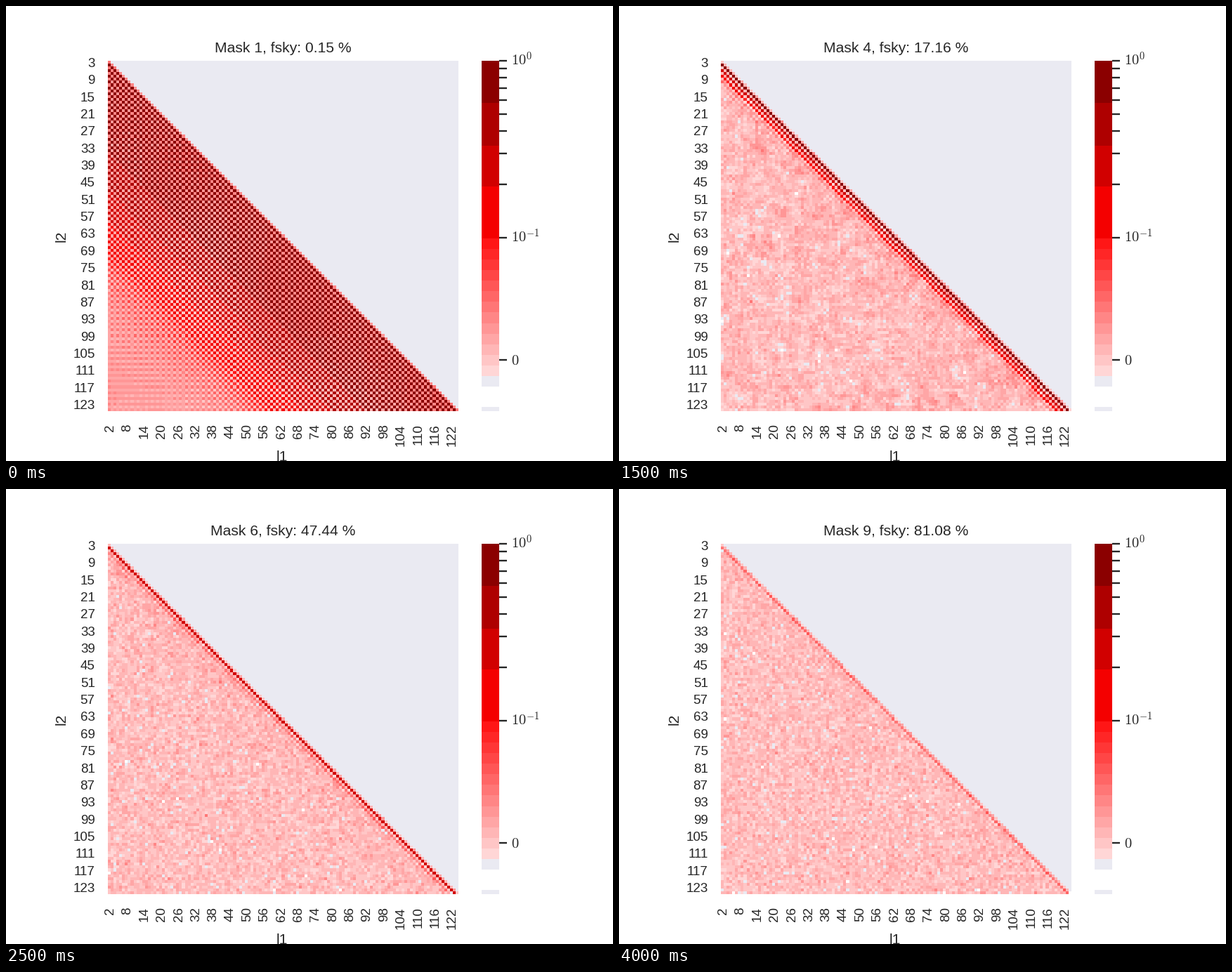
Animation, 864 px wide and 648 px high, one loop 4500 ms. Source, as a matplotlib script:

```python
import numpy as np
import matplotlib.pyplot as plt
from matplotlib.animation import FuncAnimation
from matplotlib.patches import Rectangle

plt.rcParams["font.family"] = "Liberation Sans"
plt.rcParams["mathtext.fontset"] = "cm"

W, H, DPI = 864, 648, 135
N = 123                                  # cells per side
LEFT, RIGHT, TOP, BOTTOM = 144.72, 643.68, 77.76, 576.72
CELL = (RIGHT - LEFT) / N
BAR_X, BAR_W, TICK = 677.16, 24.95, 11.25
INK = "#262626"
PALE, WHITE = (234, 234, 242), (255, 255, 255)

SKY = [0.15, 2.73, 7.48, 17.16, 31.57, 47.44, 63.33, 72.52, 81.08]  # percent

# Colour bands from the top of the colour bar to its bottom
EDGES = np.r_[TOP, 138, 199, 257, 331.2 + 15.04 * np.arange(15), 571.2, BOTTOM]
DARK = [(int(r), 0, 0) for r in np.linspace(139, 244, 4)]
TINTS = [(255, int(g), int(g)) for g in np.linspace(22, 214, 13)]
COLORS = np.array(DARK + TINTS + [PALE, WHITE, PALE], dtype=np.uint8)

row, col = np.mgrid[:N, :N]
gap = np.maximum(row - col + 1, 0)       # l2 - l1


def bar_y(v):
    """Height on the colour bar: linear below 0.1, logarithmic above."""
    v = np.asarray(v, float)
    log = 330 - 252.2 * (np.log10(np.maximum(v, 0.1)) + 1)
    return np.where(v > 0.1, log, 504 - 1740 * v)


def smooth_noise(rng, blur):
    f = np.fft.fftfreq(N)
    soft = np.exp(-2 * (np.pi * blur) ** 2 * (f[:, None] ** 2 + f ** 2))
    z = np.fft.ifft2(np.fft.fft2(rng.standard_normal((N, N))) * soft).real
    return (z - z.mean()) / z.std()


def plaid_noise(rng, blur):
    """Smooth noise that differs between odd and even rows and columns."""
    shared, *parts = (smooth_noise(rng, blur) for _ in range(5))
    return 0.6 * shared + 0.8 * np.choose(2 * (row % 2) + col % 2, parts)


def heatmap(k):
    sky = SKY[k]
    hidden = 1 - sky / 100
    width = 16 / np.sqrt(sky)            # a smaller patch couples wider
    blur = max(6 / np.sqrt(sky) - 0.6, 0)
    ridge = hidden ** 1.3 * np.exp(-(gap / width) ** 2)
    tail = 0.07 * hidden * np.exp(-gap / (3 + width))
    v = np.where(gap % 2 == 0, ridge + tail, 0.15 * tail)
    v += 0.004 + 0.012 / (1 + sky)
    v += 0.009 * plaid_noise(np.random.default_rng(40 + k), blur)
    band = np.searchsorted(EDGES, bar_y(np.minimum(v, 1)), side="right") - 1
    img = COLORS[np.clip(band, 0, len(COLORS) - 1)]
    img[col > row] = PALE
    return img


def title_text(k):
    return f"Mask {k + 1}, fsky: {SKY[k]:.2f} %"


fig = plt.figure(figsize=(W / DPI, H / DPI), dpi=DPI, facecolor="white")
ax = fig.add_axes([0, 0, 1, 1])
ax.axis("off")

maps = [heatmap(k) for k in range(len(SKY))]
image = ax.imshow(maps[0], extent=(LEFT, RIGHT, BOTTOM, TOP),
                  interpolation="nearest", aspect="auto")
ax.set_xlim(0, W)
ax.set_ylim(H, 0)


def label(x, y, s, size, ha="center", rotation=0):
    return ax.text(x, y, s, size=size, color=INK, ha=ha, va="baseline",
                   rotation=rotation, rotation_mode="anchor")


mid_x, mid_y = (LEFT + RIGHT) / 2, (TOP + BOTTOM) / 2
title = label(mid_x, 66.5, title_text(0), 11.3)
label(mid_x - 1, 648.5, "l1", 11.3)
label(85, mid_y + 0.5, "l2", 11.3, rotation=90)

for i in range(0, N, 6):
    at = (i + 0.5) * CELL
    label(126.6, TOP + at + 7.3, str(i + 3), 10, ha="right")
    label(LEFT + at + 6.5, 595.3, str(i + 2), 10, ha="right", rotation=90)

for y0, y1, c in zip(EDGES[:-1], EDGES[1:], COLORS):
    ax.add_patch(Rectangle((BAR_X, y0), BAR_W, y1 - y0, lw=0,
                           color=c / 255, antialiased=False))
for y in bar_y(np.arange(11) / 10):
    x = BAR_X + BAR_W
    ax.plot([x, x + TICK], [y, y], color=INK, lw=1.25, solid_capstyle="butt")
for v, s in ((1, "$10^{0}$"), (0.1, "$10^{-1}$"), (0, "$0$")):
    label(719, float(bar_y(v)) + 7, s, 11, ha="left")


def draw(k):
    image.set_data(maps[k])
    title.set_text(title_text(k))
    return image, title


anim = FuncAnimation(fig, draw, frames=len(SKY), interval=500,
                     repeat=True, repeat_delay=0, blit=False)
plt.show()
```
